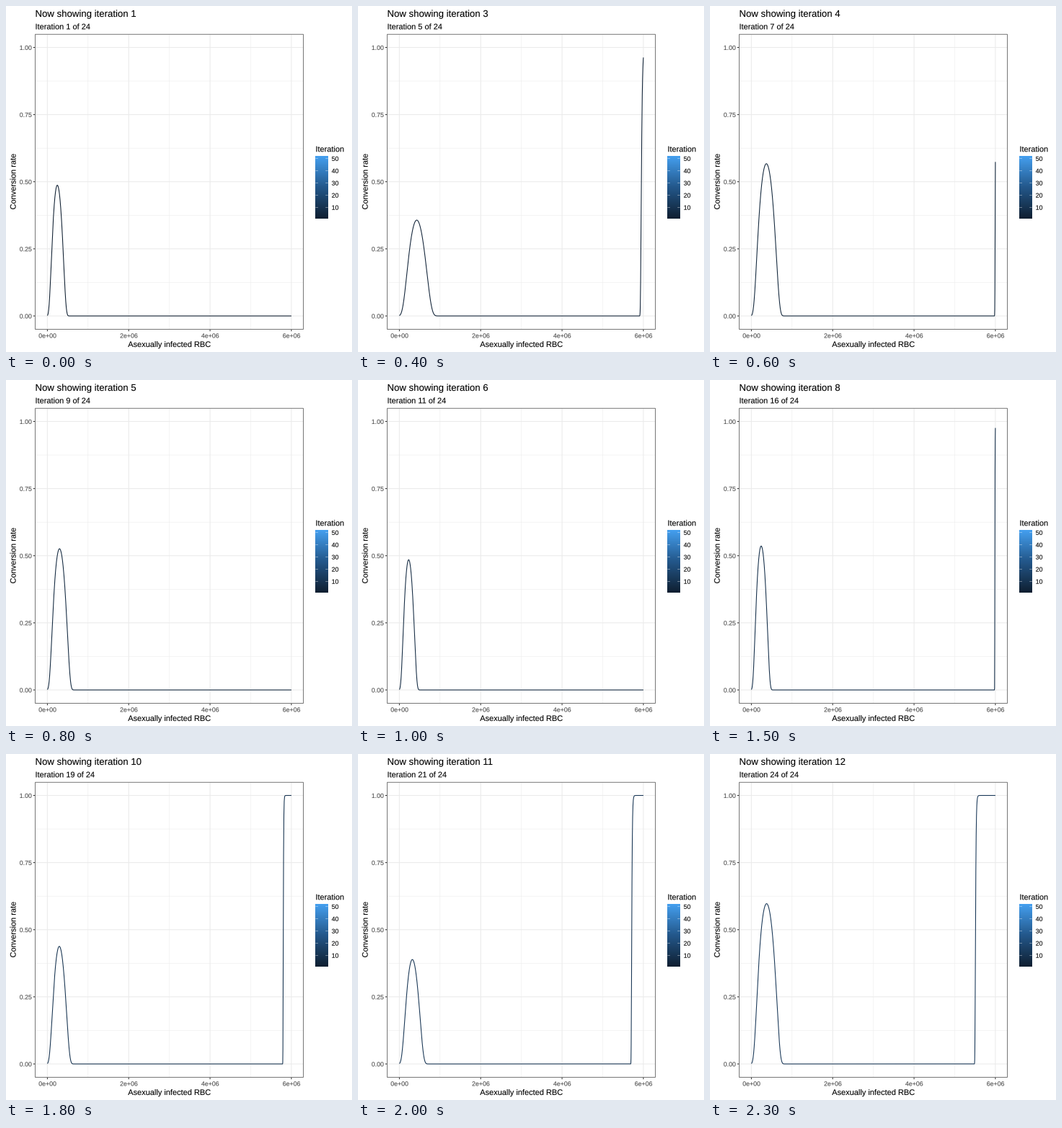
These frames come from a looping animation (480 by 480 pixels, 2.4 s). A matplotlib script:

```python
import numpy as np
import matplotlib.pyplot as plt
from matplotlib.animation import FuncAnimation
from matplotlib.colors import LinearSegmentedColormap
from matplotlib.patches import PathPatch, Rectangle
from matplotlib.textpath import TextPath
from matplotlib.transforms import Affine2D

plt.rcParams.update({"font.family": "Liberation Sans", "path.snap": False})

SIZE, DPI = 480, 72  # one point equals one pixel
FRAMES, HOLD = 24, 2
LEFT, RIGHT, TOP, BOTTOM = 40.5, 412.5, 39.3, 448.5
X0, X1, Y0, Y1 = 57.4, 395.9, 430.0, 57.5
DARK, GREY, GRID = "#333333", "#4D4D4D", "#EBEBEB"
BLUES = LinearSegmentedColormap.from_list(
    "blues", ["#0F1F31", "#23578A", "#449FEF"])
LINE = 1.07
FLOOR, SKEW = 0.0014, 0.07

# state: bump height, bump centre, start of the late rise, its rate
KEYS = {
    1: (0.487, 71.2, 400, 1),
    3: (0.357, 81.5, 390.9, 1.04),
    4: (0.567, 78.2, 394.7, 2.1),
    6: (0.485, 70.3, 400, 1),
    8: (0.536, 71.0, 394.7, 4.7),
    11: (0.389, 75.4, 378.4, 1.7),
    12: (0.597, 78.5, 366.9, 1.6),
}


def loglog(p):
    return np.log(-np.log(p))


def inv_loglog(g):
    return np.exp(-np.exp(np.clip(g, -20, 6)))


def px(v):
    return X0 + v * (X1 - X0)


def py(v):
    return Y0 + v * (Y1 - Y0)


def conversion(x, state):
    peak, centre, start, rate = (
        np.interp(state, list(KEYS), col) for col in zip(*KEYS.values()))
    low, high = loglog(peak), loglog(FLOOR)
    u = (x - centre) / (centre - X0)
    valley = u ** 2 * np.maximum(1 - SKEW * u, 0.5) / (1 + SKEW)
    bump = inv_loglog(low + (high - low) * valley)
    rise = inv_loglog(loglog(0.001) - rate * (x - start))
    return np.maximum(bump, rise)


fig = plt.figure(figsize=(SIZE / DPI, SIZE / DPI), dpi=DPI, facecolor="white")
ax = fig.add_axes([0, 0, 1, 1])
ax.set_xlim(0, SIZE)
ax.set_ylim(SIZE, 0)
ax.axis("off")


def seg(x, y, color, width=LINE, z=1):
    ax.plot(x, y, color=color, lw=width, zorder=z, solid_capstyle="butt")


def text_path(x, y, s, size, align=0, turn=0):
    """Outline of s; align 0, 0.5 or 1 puts its left, middle or right at x."""
    path = TextPath((0, 0), s, size=size)
    shift = -align * path.get_extents().x1
    move = Affine2D().translate(shift, 0).scale(1, -1)
    return move.rotate_deg(-turn).translate(x, y).transform_path(path)


def label(*args, color="black", **kw):
    patch = PathPatch(text_path(*args, **kw), fc=color, ec=color, lw=0.1,
                      zorder=6)
    return ax.add_patch(patch)


def draw_panel():
    for i in range(3):
        x = px((2 * i + 1) / 6)
        seg([x, x], [TOP, BOTTOM], GRID, LINE / 2)
    for i in range(4):
        y = py((2 * i + 1) / 8)
        seg([LEFT, RIGHT], [y, y], GRID, LINE / 2)
    for i in range(4):
        x = px(i / 3)
        seg([x, x], [TOP, BOTTOM], GRID, z=2)
        seg([x, x], [BOTTOM, BOTTOM + 2.75], DARK, z=2)
        label(x, 460.4, f"{2 * i}e+0{6 if i else 0}", 8.8, 0.5, color=GREY)
    for i in range(5):
        y = py(i / 4)
        seg([LEFT, RIGHT], [y, y], GRID, z=2)
        seg([LEFT - 2.75, LEFT], [y, y], DARK, z=2)
        label(35.5, y + 3.4, f"{i / 4:.2f}", 8.8, 1, color=GREY)
    ax.add_patch(Rectangle((LEFT, TOP), RIGHT - LEFT, BOTTOM - TOP, fill=False,
                           ec="#777777", lw=1, zorder=5, joinstyle="miter"))
    label((LEFT + RIGHT) / 2, 473, "Asexually infected RBC", 11, 0.5)
    label(13.5, (TOP + BOTTOM) / 2, "Conversion rate", 11, 0.5, turn=90)


def draw_legend():
    left, right, top, bottom = 429.4, 446.7, 208.3, 294.7
    label(left, 202.2, "Iteration", 11)
    ramp = np.linspace(1, 0, 256)[:, None]
    ax.imshow(ramp, cmap=BLUES, extent=(left, right, bottom, top),
              aspect="auto", interpolation="bilinear", zorder=2)
    for n in range(10, 51, 10):
        y = bottom - (n - 1) / 51 * (bottom - top)
        seg([left, left + 3.46], [y, y], "white", 0.4, 3)
        seg([right - 3.46, right], [y, y], "white", 0.4, 3)
        label(451.7, y + 3.2, str(n), 8.8)


draw_panel()
draw_legend()

title = label(40.5, 15, "N", 13.2)
subtitle = label(40.5, 32.3, "I", 11)
xs = np.linspace(X0, X1, 1500)
curve, = ax.plot([], [], lw=LINE, zorder=4, solid_capstyle="butt",
                 solid_joinstyle="round")


def update(frame):
    state = frame // HOLD + 1
    title.set_path(text_path(40.5, 15, f"Now showing iteration {state}", 13.2))
    subtitle.set_path(
        text_path(40.5, 32.3, f"Iteration {frame + 1} of {FRAMES}", 11))
    curve.set_data(xs, py(conversion(xs, state)))
    curve.set_color(BLUES((state - 1) / 51))
    return title, subtitle, curve


anim = FuncAnimation(fig, update, frames=FRAMES, interval=100, repeat=True,
                     repeat_delay=0, blit=False)
plt.show()
```
